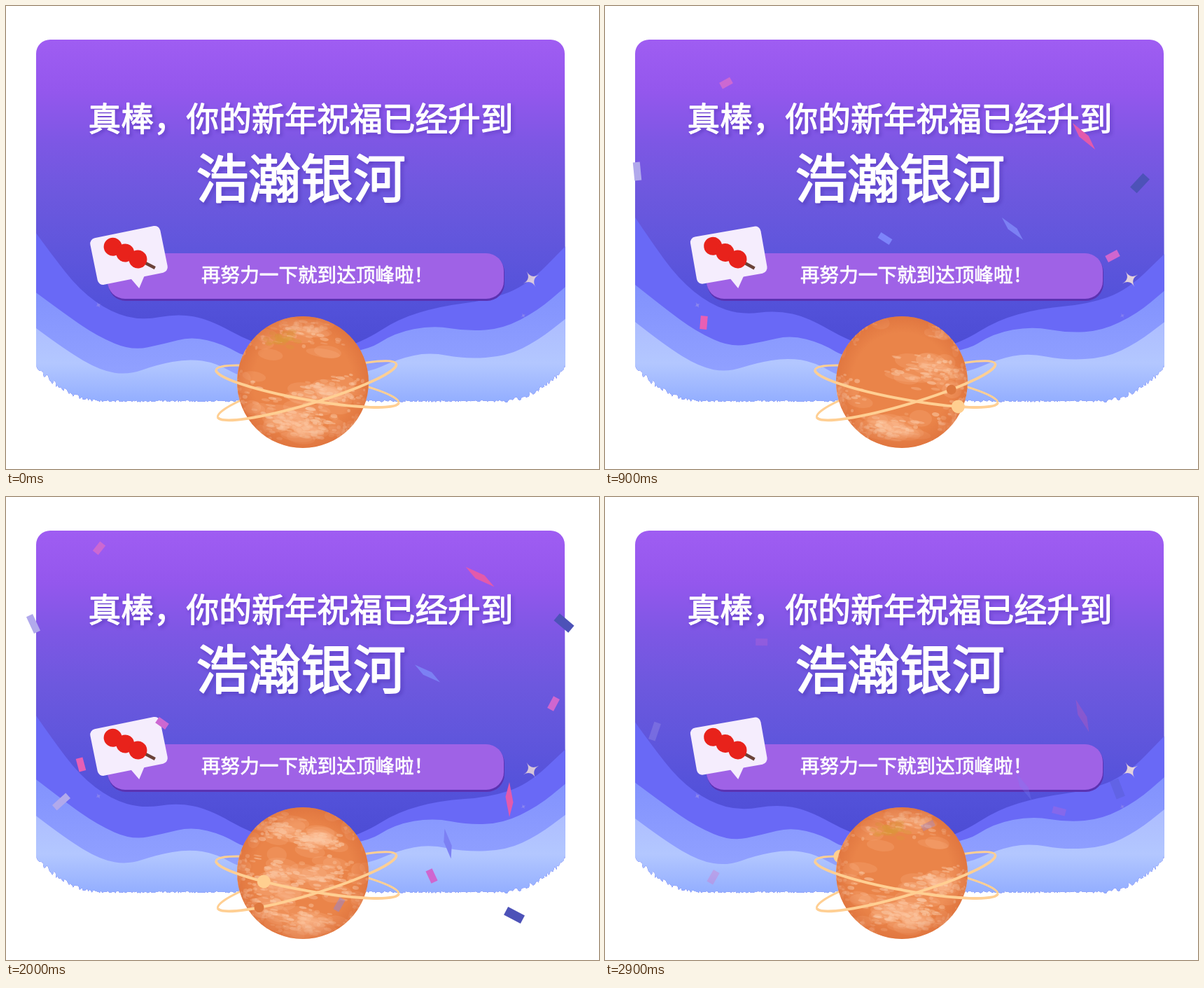
Write an HTML page with a canvas that moves like this. It is 847 px wide and 661 px high and loops after 3000 ms.

```html
<!DOCTYPE html>
<html lang="zh-CN">
<head>
<meta charset="utf-8">
<style>
html, body { margin: 0; width: 847px; height: 661px; overflow: hidden; background: #fff; }
canvas { display: block; }
</style>
</head>
<body>
<canvas id="stage" width="847" height="661"></canvas>
<script>
const ctx = document.getElementById('stage').getContext('2d');
const LOOP = 3000, BURST = 1500, STEP = 100, TAU = Math.PI * 2, DEG = Math.PI / 180;
const FONT = '"Noto Sans CJK SC", "Noto Sans CJK", sans-serif';
const clamp = v => Math.max(0, Math.min(1, v));
const wave = (t, peak, period) => Math.cos(TAU * (t - peak) / period);

function seeded(seed) {
  return () => (seed = (seed * 16807) % 2147483647) / 2147483647;
}

// Linear interpolation between keys, extended beyond both ends.
function track(times, values, t) {
  let i = 1;
  while (i < times.length - 1 && t > times[i]) i++;
  const p = (t - times[i - 1]) / (times[i] - times[i - 1]);
  return values[i - 1] + (values[i] - values[i - 1]) * p;
}

function at(x, y, angle, draw) {
  ctx.save();
  ctx.translate(x, y);
  ctx.rotate(angle * DEG);
  draw();
  ctx.restore();
}

function disc(x, y, r, color) {
  ctx.fillStyle = color;
  ctx.beginPath();
  ctx.arc(x, y, r, 0, TAU);
  ctx.fill();
}

function box(x, y, w, h, r, color) {
  ctx.fillStyle = color;
  ctx.beginPath();
  ctx.roundRect(x, y, w, h, r);
  ctx.fill();
}

function polygon(points, color) {
  ctx.fillStyle = color;
  ctx.beginPath();
  points.forEach(p => ctx.lineTo(...p));
  ctx.fill();
}

function gradient(y0, y1, ...colors) {
  const g = ctx.createLinearGradient(0, y0, 0, y1);
  colors.forEach((c, i) => g.addColorStop(i / (colors.length - 1), c));
  return g;
}

// Card with a ragged lower edge
const card = new Path2D();
{
  const rand = seeded(11);
  card.moveTo(43, 515);
  card.lineTo(43, 68);
  card.arcTo(43, 48, 63, 48, 20);
  card.lineTo(778, 48);
  card.arcTo(798, 48, 798, 68, 20);
  card.lineTo(799, 515);
  for (let x = 799; x >= 43; x -= 2) {
    const edge = clamp((Math.abs(x - 420.5) - 278) / 100);
    card.lineTo(x + rand() * 2, 564 - 48 * edge ** 2.2 + (rand() - 0.5) * (3 + 6 * Math.sqrt(edge)));
  }
  card.closePath();
}
const cardFill = gradient(48, 490, '#9f5df2', '#9457ed', '#7d57e4', '#6d58de', '#6056dc', '#5452da', '#4c4cd4');

const hills = [
  { fill: '#6969f6', sway: 1, points: [[42, 312], [65, 345], [105, 398], [150, 432], [195, 445], [245, 437], [290, 446],
    [350, 480], [430, 505], [510, 480], [560, 448], [620, 431], [690, 424], [745, 404], [799, 351]] },
  { fill: gradient(400, 520, '#8292fd', '#90a0ff'), sway: 0.5, points: [[42, 403], [85, 436], [130, 468], [180, 490],
    [225, 481], [265, 471], [310, 482], [350, 506], [510, 496], [555, 467], [610, 457], [660, 466], [710, 463], [760, 438], [799, 405]] },
  { fill: gradient(455, 565, '#aebeff', '#b3c7ff', '#93aeff'), sway: 0.4, points: [[42, 455], [85, 488], [135, 518],
    [175, 525], [215, 511], [260, 503], [300, 509], [345, 535], [510, 527], [560, 504], [605, 495], [655, 505], [715, 502], [760, 480], [799, 450]] }
];

function drawCard(t) {
  ctx.save();
  ctx.clip(card);
  ctx.fillStyle = cardFill;
  ctx.fillRect(0, 0, 847, 661);
  const left = 12 * wave(t, 100, BURST), right = 10 * wave(t, 600, BURST);
  for (const { fill, sway, points } of hills) {
    const pts = points.map(([x, y]) => [x, y + sway * (x < 420 ? left : right) * ((x - 420) / 379) ** 2]);
    ctx.fillStyle = fill;
    ctx.beginPath();
    ctx.moveTo(...pts[0]);
    for (let i = 1; i < pts.length - 1; i++) {
      const [x, y] = pts[i], [nx, ny] = pts[i + 1];
      ctx.quadraticCurveTo(x, y, (x + nx) / 2, (y + ny) / 2);
    }
    ctx.lineTo(...pts[pts.length - 1]);
    ctx.lineTo(800, 600);
    ctx.lineTo(42, 600);
    ctx.fill();
  }
  ctx.restore();
}

function star(x, y, r, alpha) {
  ctx.globalAlpha = clamp(alpha);
  at(x, y, -30, () => {
    ctx.fillStyle = '#f3dfd9';
    ctx.beginPath();
    ctx.moveTo(r, 0);
    for (let i = 1; i <= 4; i++) {
      const a = i * Math.PI / 2;
      ctx.quadraticCurveTo(0, 0, r * Math.cos(a), r * Math.sin(a));
    }
    ctx.fill();
  });
  ctx.globalAlpha = 1;
}

function label(text, x, y, size, shadow) {
  ctx.save();
  ctx.font = `400 ${size}px ${FONT}`;
  ctx.fillStyle = ctx.strokeStyle = '#fff';
  ctx.lineJoin = 'round';
  ctx.lineWidth = size * 0.028;
  if (shadow) {
    ctx.shadowColor = 'rgba(66, 40, 165, .6)';
    ctx.shadowOffsetX = ctx.shadowOffsetY = 3;
    ctx.shadowBlur = 4;
  }
  ctx.strokeText(text, x, y);
  ctx.shadowColor = 'transparent';
  ctx.fillText(text, x, y);
  ctx.restore();
}

// Planet: patches are [longitude, latitude, spread] in degrees
const PLANET = { x: 424, y: 537, r: 94 };
const patches = [[0, -40, 45], [0, 48, 42], [31, -8, 26], [138, 10, 28], [200, 45, 32], [190, -30, 36],
  [200, -5, 36], [240, -50, 40], [270, -5, 34], [250, 30, 22], [348, -35, 45], [90, -45, 30]];
const specks = [];
{
  const rand = seeded(77);
  const spread = () => rand() + rand() + rand() - 1.5;
  const scatter = (count, [lon, lat, size], look) => {
    for (let i = 0; i < count; i++)
      specks.push({ lon: lon + spread() * size * 1.3, lat: lat + spread() * size * 0.5, ...look() });
  };
  for (const patch of patches) {
    scatter(14, patch, () => ({ w: 15 + rand() * 12, h: 6 + rand() * 6, alpha: 0.16, color: '#fac8a4' }));
    scatter(60, patch, () => ({ w: 2 + rand() * 6, h: 1 + rand() * 2, alpha: 0.2 + rand() * 0.4, color: '#fac8a4' }));
  }
  scatter(25, [334, 41, 18], () => ({ w: 6, h: 3, alpha: 0.4, color: '#d9963a' }));
}

function drawPlanet(t) {
  const { x, y, r } = PLANET;
  ctx.save();
  disc(x, y, r, '#ea8449');
  ctx.clip();
  for (const s of specks) {
    const lon = (s.lon - 0.12 * t) * DEG, facing = Math.cos(lon), lat = s.lat * DEG;
    if (facing <= 0) continue;
    ctx.globalAlpha = s.alpha;
    ctx.fillStyle = s.color;
    ctx.beginPath();
    ctx.ellipse(x + r * Math.cos(lat) * Math.sin(lon), y - r * Math.sin(lat), s.w * facing + 0.5, s.h, 0.15, 0, TAU);
    ctx.fill();
  }
  ctx.globalAlpha = 1;
  const shade = ctx.createRadialGradient(x, y, r * 0.75, x, y, r);
  shade.addColorStop(0, 'rgba(215, 105, 55, 0)');
  shade.addColorStop(1, 'rgba(215, 105, 55, .5)');
  disc(x, y, r, shade);
  ctx.restore();
}

const rings = [
  { x: 430, y: 549, a: 133, b: 19.5, tilt: -16.6, moon: 7, color: '#de783e', lead: 8 },
  { x: 430.5, y: 543, a: 132.5, b: 19, tilt: 10.2, moon: 9.5, color: '#ffcf90', lead: 0 }
];
const orbitTimes = [0, 300, 900, 1600, 2000, 2500, 2900, 3000];
const orbitAngles = [248, 328, 414, 454.5, 477, 517, 582, 608];

function drawRings(t, front) {
  for (const ring of rings) {
    at(ring.x, ring.y, ring.tilt, () => {
      ctx.strokeStyle = '#ffcf93';
      ctx.lineWidth = front ? 3.8 : 3;
      ctx.beginPath();
      ctx.ellipse(0, 0, ring.a, ring.b, 0, front ? 0 : Math.PI, front ? Math.PI : TAU);
      ctx.stroke();
    });
  }
  for (const ring of rings) {
    const angle = (track(orbitTimes, orbitAngles, t) + ring.lead) * DEG;
    if (Math.sin(angle) >= 0 !== front) continue;
    at(ring.x, ring.y, ring.tilt, () =>
      disc(ring.a * Math.cos(angle), ring.b * Math.sin(angle), ring.moon, ring.color));
  }
}

function drawBubble(t) {
  at(190, 402, -3.5 - 8 * wave(t, 0, 1000), () => {
    box(-56, -82, 102, 68, 8, '#f5edfd');
    polygon([[-9, -15], [0, 1], [11, -15]], '#f5edfd');
    ctx.strokeStyle = '#6b4238';
    ctx.lineWidth = 4.5;
    ctx.beginPath();
    ctx.moveTo(8, -39);
    ctx.lineTo(28, -23);
    ctx.stroke();
    disc(-25, -64.5, 13, '#e8221b');
    disc(-9.5, -52.5, 13, '#e8221b');
    disc(6.5, -40, 13, '#e8221b');
  });
}

// Confetti: positions at pathTimes, turn from spin[0] to spin[1] between 500 and 2000 ms
const pathTimes = [300, 500, 900, 1600, 2000];
const confetti = [
  { color: '#e85fb4', w: 10, h: 19, life: [200, 1850], spin: [-15, 60],
    x: [88, 107, 141, 160, 158], y: [358, 382, 452, 579, 630] },
  { color: '#cf66cf', w: 10, h: 19, life: [200, 2200], spin: [28, 155],
    x: [795, 782, 725, 618, 608], y: [273, 295, 357, 485, 541] },
  { color: '#7c80f3', w: 10, h: 44, life: [230, 2200], spin: [-55, -12], blade: true,
    x: [616, 602, 582, 605, 631], y: [236, 252, 318, 452, 495] },
  { color: '#e35aab', w: 11, h: 50, life: [380, 2250], spin: [-55, 0], blade: true,
    x: [674, 677, 684, 681, 719], y: [85, 114, 186, 363, 432] },
  { color: '#cc68d2', w: 10, h: 17, life: [380, 2250], spin: [38, 125],
    x: [113, 133, 173, 244, 223], y: [55, 73, 110, 246, 323] },
  { color: '#b1a9ec', w: 10, h: 26, life: [380, 2200], spin: [-25, 48],
    x: [36, 39, 46, 81, 79], y: [155, 181, 236, 374, 435] },
  { color: '#4d52b8', w: 13, h: 27, life: [380, 2250], spin: [-50, 298],
    x: [813, 797, 764, 719, 726], y: [145, 180, 253, 482, 597] },
  { color: '#7d84fa', w: 9, h: 19, life: [780, 2080], spin: [-155, 210],
    x: [270, 312, 400, 486, 476], y: [237, 262, 332, 524, 582] },
  { color: '#7d84fa', w: 9, h: 19, life: [1480, 1850], spin: [-50, -45],
    x: [220, 228, 240, 264, 280], y: [20, 50, 110, 221, 290] }
];

function drawBurst(age, fade) {
  for (const c of confetti) {
    const [born, end] = c.life;
    const alpha = fade * clamp((age - born) / 100) * clamp((end - age) / 200);
    if (alpha <= 0) continue;
    ctx.globalAlpha = alpha;
    const w = c.w / 2, h = c.h / 2;
    at(track(pathTimes, c.x, age), track(pathTimes, c.y, age), track([500, 2000], c.spin, age), () =>
      polygon(c.blade ? [[0, -h], [w, 4], [0, h], [-w, -4]] : [[-w, -h], [w, -h], [w, h], [-w, h]], c.color));
  }
  ctx.globalAlpha = 1;
}

function draw(t) {
  ctx.fillStyle = '#fff';
  ctx.fillRect(0, 0, 847, 661);
  drawCard(t);
  const twinkle = wave(t, 900, 1000);
  star(750, 390, 13, 0.45 + 0.45 * twinkle);
  star(739, 442, 4, 0.25 * wave(t, 0, 1000));
  star(132, 427, 5, 0.25 * twinkle);
  box(146, 355, 566, 66, 25, '#5b32b2');
  box(145, 353, 566, 65, 25, '#9f62e6');
  label('再努力一下就到达顶峰啦！', 279, 394, 27.6, false);
  label('真棒，你的新年祝福已经升到', 117.5, 178, 46.7, true);
  label('浩瀚银河', 271.5, 273.5, 74.8, true);
  drawRings(t, false);
  drawPlanet(t);
  drawRings(t, true);
  drawBubble(t);
  drawBurst(t, 1);
  if (t > BURST) drawBurst(t - BURST, clamp((2960 - t) / 220));
}

const start = performance.now();
function frame() {
  const t = (performance.now() - start) % LOOP;
  draw(Math.floor(t / STEP) * STEP);
  requestAnimationFrame(frame);
}
frame();
</script>
</body>
</html>
```
